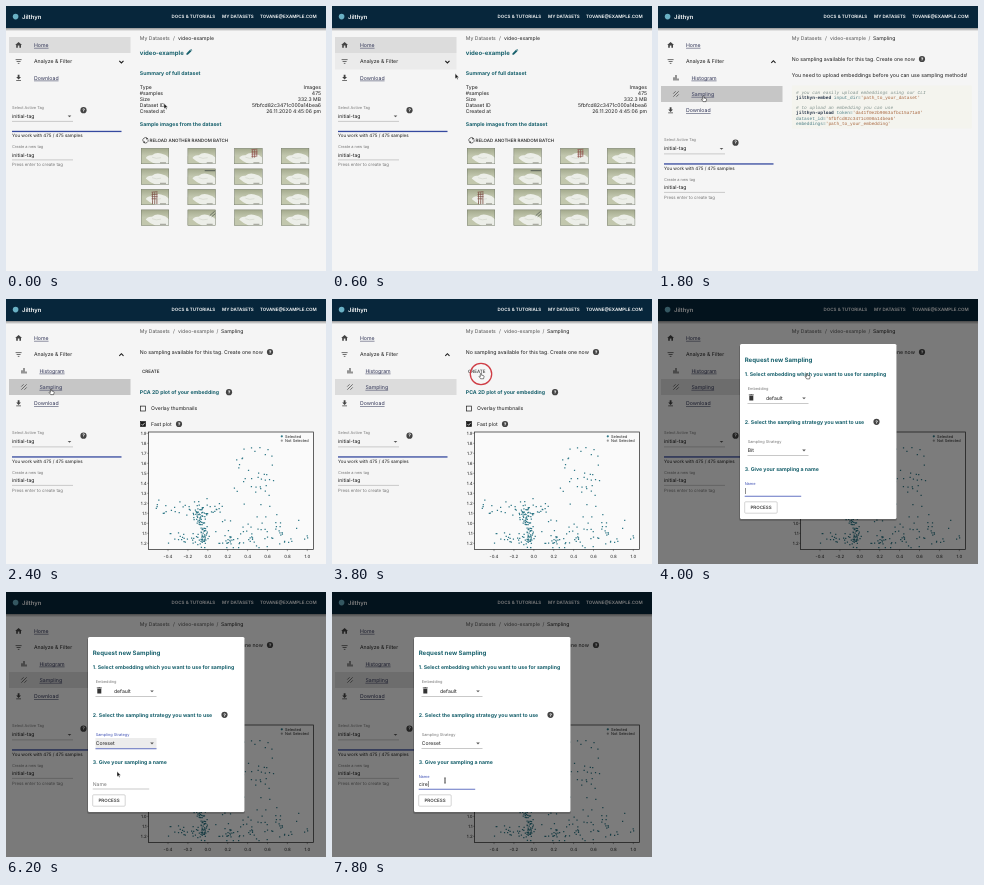
An HTML page for the animation above (8000 ms loop, 320 px wide and 265 px high).

```html
<!DOCTYPE html>
<html lang="en">
<head>
<meta charset="utf-8">
<title>Dataset sampling walkthrough</title>
<style>
  html, body { margin: 0; width: 100%; height: 100%; overflow: hidden; background: #f5f5f5; }
  svg { display: block; width: 100vw; height: 100vh; }
  text { font-family: Inter, "Open Sans", sans-serif; fill: #1c1c1c; white-space: pre; text-rendering: geometricPrecision; }
  .link { text-decoration: underline; fill: #303456; }
  .soft { fill: #777; }
  .crumb { fill: #555; }
  .head { fill: #17606c; font-weight: 700; }
  .nav { fill: #fff; font-weight: 600; }
  .mid { font-weight: 500; }
  .end { text-anchor: end; }
  .center { text-anchor: middle; }
  .code { font-family: "Liberation Mono", monospace; fill: #27343c; }
  .rem { fill: #7f918c; font-style: italic; }
  .cmd { fill: #1f2f45; font-weight: 700; }
  .str { fill: #a8673f; }
  .arg { fill: #4d7f86; }
</style>
</head>
<body>
<svg id="stage" viewBox="0 0 320 265" preserveAspectRatio="none"></svg>
<script>
const LOOP = 8000, STEP = 200, SHIFT = 32.5;
const INK = '#1c1c1c', BLUE = '#3f51b5', TEAL = '#2f7887';

// y is the middle of the capital letters
const text = (x, y, s, cls = '', size = 5.1, id = '') =>
  `<text ${id && `id="${id}"`} x="${x}" y="${(y + size * .36).toFixed(2)}" class="${cls}" font-size="${size}">${s}</text>`;
const rect = (x, y, w, h, fill, more = '') =>
  `<rect x="${x}" y="${y}" width="${w}" height="${h}" fill="${fill}" ${more}/>`;
const path = (d, more = `fill="${INK}"`) => `<path d="${d}" ${more}/>`;
const line = (d, width = .8, color = INK) =>
  path(d, `fill="none" stroke="${color}" stroke-width="${width}"`);
const at = (x, y, s) => `<g transform="translate(${x} ${y})">${s}</g>`;
const group = (id, s, more = '') => `<g id="${id}" ${more}>${s}</g>`;
const range = n => [...Array(n).keys()];

const help = (x, y) => at(x, y, `<circle r="3.1" fill="#444"/>` +
  `<text y="1.75" class="center" font-size="4.8" font-weight="700" style="fill:#fff">?</text>`);
const dropArrow = (x, y) => path(`M${x - 1.8} ${y - .8}h3.6l-1.8 1.8z`, 'fill="#555"');

const icons = {
  home: path('M0-3L3.4 0H2.4V2.8H.8V.6H-.8V2.8H-2.4V0H-3.4z', 'fill="#444"'),
  filter: line('M-3-1.9H3M-2 0H2M-.8 1.9H.8', .75, '#444'),
  bars: line('M-2 2.7V-.6M0 2.7V-2.7M2 2.7V.6', 1.1, '#444'),
  texture: line('M-2.7-.4L-.4-2.7M-2.7 2.7L2.7-2.7M.4 2.7L2.7 .4', .7, '#444'),
  download: path('M-.9-3H.9V-.7H2.4L0 1.7L-2.4-.7H-.9zM-2.4 2.3H2.4V3H-2.4z', 'fill="#444"'),
  pencil: path('M-2.6 2.6V1.2L1-2.4L2.4-1L-1.2 2.6zM1.4-2.8L2-3.3L3.3-2L2.8-1.4z', 'fill="#17606c"'),
  reload: line('M-2.6 .8A2.7 2.7 0 0 1 1.8-2M2.6-.8A2.7 2.7 0 0 1-1.8 2', .6) +
    path('M1-2.9L2.8-1.4L.8-.9zM-1 2.9L-2.8 1.4L-.8.9z'),
  trash: path('M-2-1.7H2V3H-2zM-2.5-2.9H-1L-.6-3.3H.6L1-2.9H2.5V-2.2H-2.5z', 'fill="#333"')
};

function header() {
  return rect(0, 22, 320, 3.2, 'url(#shade)') + rect(0, 0, 320, 22, '#07263b') +
    `<circle cx="9.6" cy="10.6" r="2.8" fill="#69b0c4"/>` +
    text(16, 10.6, 'Jilthyn', 'nav', 5.9) +
    text(165.6, 10.8, 'DOCS &amp; TUTORIALS', 'nav', 4.5) +
    text(216, 10.8, 'MY DATASETS', 'nav', 4.5) +
    text(254, 10.8, 'TOVANE@EXAMPLE.COM', 'nav', 4.5);
}

function sidebar() {
  const row = (icon, x, y, s, cls = 'link') =>
    at(x, y, icons[icon]) + text(x + 15.4, y, s, cls, 5.2);
  return rect(3, 31, 121.5, 16, '#dcdcdc', 'id="homeRow"') +
    rect(3, 47, 121.5, 16.5, '#ebebeb', 'id="filterRow"') +
    row('home', 12.6, 39, 'Home') +
    row('filter', 12.6, 55.5, 'Analyze &amp; Filter', '') +
    group('chevron', line('M113.3 54.8L115.4 56.9L117.5 54.8', 1.1)) +
    `<clipPath id="fold"><rect id="foldBox" y="63.5" width="125" height="0"/></clipPath>` +
    group('submenu', rect(3, 80, 121.5, 16, '#dcdcdc', 'id="samplingRow"') +
      row('bars', 18, 71.8, 'Histogram') + row('texture', 18, 88, 'Sampling'),
      'clip-path="url(#fold)"') +
    group('lower', row('download', 12.6, 71.8, 'Download') +
      text(6, 101.2, 'Select Active Tag', 'soft', 3.9) + text(6, 110, 'initial-tag') +
      dropArrow(63.5, 110.2) + help(77.5, 104.2) + line('M6 115.4H67', .35, '#777') +
      rect(6, 124.8, 109.5, 1.3, '#35499f') +
      text(6, 129.4, 'You work with 475 / 475 samples', '', 4.5) +
      text(6, 140.6, 'Create a new tag', 'soft', 3.9) + text(6, 149, 'initial-tag') +
      line('M6 153.9H67', .35, '#777') +
      text(6, 158.5, 'Press enter to create tag', 'soft', 4.4));
}

function thumb(i) {
  const tower = 'M0 0l6-.6M0 2.2h6M0 4.4h6M0 6.6h5M1 0v8M3.2 0v8M5.4 0v7';
  const extra = i === 2 ? at(17, 1.5, line(tower, .7, '#8f4f48')) :
    i === 8 ? at(10.5, 3, line(tower, .7, '#7d5046') + line('M1 8v4M3.2 8v4M5.4 7v5', .8, '#7d5046')) :
    i === 5 ? line('M17 2H27.5', .9, '#4a524b') :
    i === 13 ? line('M22 6L27 1.5M24 7L27.6 4', .7, '#4a524b') : '';
  return at(135 + i % 4 * 46.7, 142.2 + Math.floor(i / 4) * 20.5,
    rect(0, 0, 28, 15.8, 'url(#grass)') +
    path('M4 11Q6 6.5 11 7Q15 3.6 20 5.2Q25 6 28 9.5V15.8H15Q6 14 4 11z', 'fill="#eceee8"') +
    path('M0 8Q3 7 5 10Q8 13 14 15.8H0z', 'fill="#c2c7ad"') +
    line('M11 9Q15 11 20 9.5', .6, '#cfd2c8') + line('M19 14.6H25', .7, '#77786c') + extra +
    rect(.2, .2, 27.6, 15.4, 'none', 'stroke="#6d7367" stroke-width=".4"'));
}

function overviewPage() {
  const facts = [['Type', 'Images'], ['#samples', '475'], ['Size', '332.3 MB'],
    ['Dataset ID', '5fbfcd82c3471c000a14bea6'], ['Created at', '26.11.2020 4:45:06 pm']];
  return text(133.8, 47, 'video-example', 'head', 6) + at(183, 46.2, icons.pencil) +
    text(133.8, 67.2, 'Summary of full dataset', 'head', 5.2) +
    facts.map(([k, v], i) => text(133.8, 81 + i * 6, k) + text(315, 81 + i * 6, v, 'end')).join('') +
    text(133.8, 118, 'Sample images from the dataset', 'head', 5.2) +
    at(139.5, 134.3, icons.reload) +
    text(143.5, 134.4, 'RELOAD ANOTHER RANDOM BATCH', 'mid', 4.5) +
    range(16).map(thumb).join('');
}

function uploadNotice() {
  const span = (cls, s) => `<tspan class="${cls}">${s}</tspan>`;
  const code = (y, s) => text(138, y, s, 'code', 4.5);
  const pair = (k, v) => span('arg', k + '=') + span('str', `'${v}'`);
  return text(133.8, 69.3, 'You need to upload embeddings before you can use sampling methods!', '', 5.2) +
    rect(133.8, 79.5, 180, 43, '#f4f4ee') +
    code(86, span('rem', '# you can easily upload embeddings using our CLI')) +
    code(91.5, span('cmd', 'jilthyn-embed ') + pair('input_dir', 'path_to_your_dataset')) +
    code(101, span('rem', '# to upload an embedding you can use')) +
    code(106.5, span('cmd', 'jilthyn-upload ') + pair('token', 'da41f0e2b9063afbc15a71a0')) +
    code(112, pair('dataset_id', '5fbfcd82c3471c000a14bea6')) +
    code(117.5, pair('embeddings', 'path_to_your_embedding'));
}

function seeded(seed) {
  return () => {
    seed = seed + 0x6D2B79F5 | 0;
    let r = Math.imul(seed ^ seed >>> 15, 1 | seed);
    r ^= r + Math.imul(r ^ r >>> 7, 61 | r);
    return ((r ^ r >>> 14) >>> 0) / 4294967296;
  };
}

function scatter() {
  const rnd = seeded(47);
  const bell = () => rnd() + rnd() + rnd() + rnd() - 2;
  const spots = [
    [55, () => [194 + bell() * 6, 219 + bell() * 13]],
    [40, () => [197 + bell() * 4, 239 + bell() * 8]],
    [45, () => [160 + rnd() * 90, 244 - Math.abs(bell()) * 12]],
    [40, () => [149 + rnd() * 75, 210 + bell() * 7]],
    [60, () => [215 + rnd() * 88, 232 + bell() * 15]],
    [38, () => [226 + rnd() * 42, 142 + rnd() * 65]]
  ];
  const dot = ([x, y]) => `M${x.toFixed(1)} ${Math.min(y, 248).toFixed(1)}h1.25v1.25h-1.25z`;
  return path(spots.map(([n, place]) => range(n).map(() => dot(place())).join('')).join(''),
    `fill="${TEAL}"`);
}

function plotPage() {
  const yLabels = range(12).map(i => (i < 10 ? 1.9 - i * .1 : 1 + (i - 9) * .1).toFixed(1));
  const box = y => rect(134.6, y - 2.4, 4.9, 4.9, 'none', `stroke="${INK}" stroke-width=".7"`);
  return text(136, 72.7, 'CREATE', 'mid', 4.5) +
    text(133.8, 93.2, 'PCA 2D plot of your embedding', 'head', 5.2) + help(223, 93.2) +
    box(109.5) + text(145, 109.5, 'Overlay thumbnails') +
    box(125) + rect(134.6, 122.6, 4.9, 4.9, INK) + line('M135.5 125.1L136.7 126.3L138.7 123.9', .7, '#fff') +
    text(145, 125, 'Fast plot') + help(173, 125) +
    rect(142.5, 133, 165, 117.5, '#fafafa', 'stroke="#222" stroke-width=".7"') +
    yLabels.map((s, i) => text(140.6, 134.3 + i * 10, s, 'end', 4.4) + line(`M141.2 ${134.3 + i * 10}h1.3`, .4)).join('') +
    range(8).map(i => {
      const x = 162 + i * 19.9;
      return text(x, 257.3, (i * .2 - .4).toFixed(1), 'center', 4.4) + line(`M${x} 250.5v1.6`, .4);
    }).join('') +
    scatter() +
    `<circle cx="275.8" cy="137.3" r="1.1" fill="${TEAL}"/><circle cx="275.8" cy="141.7" r="1.1" fill="#999"/>` +
    text(279, 137.3, 'Selected', '', 3.9) + text(279, 141.7, 'Not Selected', '', 3.9);
}

function dialog() {
  return rect(0, 0, 320, 265, '#000', 'opacity=".5"') +
    rect(81, 46, 158, 176, '#000', 'rx="2" opacity=".18"') +
    rect(82, 45, 156.5, 175, '#fff', 'rx="1.5"') +
    text(86.7, 60.5, 'Request new Sampling', 'head', 6.1) +
    text(86.7, 74.7, '1. Select embedding which you want to use for sampling', 'head', 5.2) +
    text(89.7, 89.5, 'Embedding', 'soft', 3.9) + at(93.3, 98.5, icons.trash) +
    text(108, 99.5, 'default') + dropArrow(146, 99.3) + line('M89.5 104.5H150.5', .4, '#777') +
    text(86.7, 122.8, '2. Select the sampling strategy you want to use', 'head', 5.2) + help(218.5, 122.8) +
    rect(89.5, 146, 61, 11, '#ececec', 'id="strategyFill"') +
    text(89.7, 142.7, 'Sampling Strategy', 'soft', 3.9, 'strategyLabel') +
    text(89.7, 151.4, 'Bit', '', 5.1, 'strategy') + dropArrow(146, 151.4) +
    rect(89.5, 156.4, 61, .4, '#777', 'id="strategyLine"') +
    text(86.7, 169.8, '3. Give your sampling a name', 'head', 5.2) +
    text(86.7, 192, 'Name', 'soft', 5.1, 'nameHint') +
    text(86.7, 184.7, 'Name', '', 3.9, 'nameLabel') +
    text(86.7, 192, '', '', 5.1, 'nameValue') +
    rect(87, 189, .5, 6, INK, 'id="caret"') +
    rect(86.7, 196.8, 56.5, .4, '#777', 'id="nameLine"') +
    rect(86.7, 202.8, 32.5, 11.4, '#fff', 'rx="1" stroke="#aaa" stroke-width=".5"') +
    text(103, 208.6, 'PROCESS', 'mid center', 4.5);
}

function pointers() {
  const edge = 'fill="#fff" stroke="#111" stroke-width=".6" stroke-linejoin="round" transform="scale(.85)"';
  return group('pointer',
    group('arrow', path('M0 0V5.2L1.3 4.1L2.2 6L3 5.6L2.2 3.8H3.8z',
      'fill="#111" stroke="#fff" stroke-width=".4"')) +
    group('hand', path('M-.7.5Q0-.5.7.5V2.4L3 2.9Q3.8 3.2 3.6 4.1L3 6.6H-.4L-2.2 4Q-2.1 3.1-1.2 3.5L-.7 4z', edge)) +
    group('beam', line('M-1-2.8Q0-2.8 0-2V2Q0 2.8-1 2.8M1-2.8Q0-2.8 0-2V2Q0 2.8 1 2.8', .5)));
}

const fade = (id, ...stops) => `<linearGradient id="${id}" x2="0" y2="1">` + stops.map(([color, alpha], i) =>
  `<stop offset="${i / (stops.length - 1)}" stop-color="${color}" stop-opacity="${alpha}"/>`).join('') + '</linearGradient>';

document.getElementById('stage').innerHTML =
  `<defs>${fade('grass', ['#a3a98c', 1], ['#c3c8b0', 1], ['#b9bfa4', 1])}${fade('shade', ['#000', .4], ['#000', 0])}</defs>` +
  rect(0, 0, 320, 265, '#f5f5f5') + header() + sidebar() +
  text(133.8, 32, 'My Datasets', 'crumb', 5.1) + text(167, 32, '/', 'crumb') +
  text(172, 32, 'video-example', '', 5.1, 'datasetCrumb') +
  group('overview', overviewPage()) +
  group('sampling', text(210.5, 32, '/', 'crumb') + text(215, 32, 'Sampling') +
    text(133.8, 53, 'No sampling available for this tag. Create one now', '', 5.2) + help(264, 53)) +
  group('notice', uploadNotice()) + group('plot', plotPage()) +
  group('ring', `<circle cx="149" cy="75" r="10.7" fill="#fff" fill-opacity=".12" stroke="#cf3d45" stroke-width="1.3"/>`) +
  group('dialog', dialog()) + pointers();

const ui = {};
document.querySelectorAll('[id]').forEach(el => ui[el.id] = el);
const show = (name, on) => ui[name].style.display = on ? '' : 'none';
const set = (name, attrs) => Object.entries(attrs).forEach(([k, v]) => ui[name].setAttribute(k, v));

const route = [[0, 158, 97.5], [200, 155, 95], [800, 112, 58], [1000, 111.2, 58], [1200, 108, 62],
  [1600, 45.5, 90], [2600, 45, 90], [3400, 146, 74.5], [3600, 149, 74], [4000, 149, 74.3],
  [4800, 140, 149], [5200, 138, 150], [5600, 112, 160], [6000, 111.5, 176], [6200, 111, 179.5],
  [6800, 112, 190], [7200, 113, 188.5], [8000, 113, 188.5]];

function along(t) {
  const i = route.findIndex(([end]) => end > t), [t0, x0, y0] = route[i - 1], [t1, x1, y1] = route[i];
  const p = (t - t0) / (t1 - t0), e = p * p * (3 - 2 * p);
  return [x0 + (x1 - x0) * e, y0 + (y1 - y0) * e];
}

function draw(t) {
  const open = t < 800 ? 0 : t < 1000 ? .6 : 1;
  const inSampling = t >= 1800, plotted = t >= 2200;
  set('foldBox', { height: SHIFT * open });
  set('lower', { transform: `translate(0 ${SHIFT * open})` });
  set('chevron', { transform: open ? 'rotate(180 115.4 55.8)' : '' });
  show('homeRow', !inSampling);
  show('filterRow', t >= 600 && t < 1400);
  show('samplingRow', t >= 1600);
  set('samplingRow', { fill: t < 1800 ? '#ebebeb' : t < 2800 ? '#c6c6c6' : '#dcdcdc' });
  set('datasetCrumb', { class: inSampling ? 'crumb' : '' });
  show('overview', !inSampling);
  show('sampling', inSampling);
  show('notice', inSampling && !plotted);
  show('plot', plotted);
  show('ring', t === 3800);
  show('dialog', t >= 4000);

  const onStrategy = t >= 5200 && t < 6800, onName = t >= 4000 && !onStrategy;
  ui.strategy.textContent = t < 5600 ? 'Bit' : 'Coreset';
  ui.strategyLabel.style.fill = onStrategy ? BLUE : '';
  set('strategyLine', { fill: onStrategy ? BLUE : '#777', height: onStrategy ? .8 : .4 });
  show('strategyFill', onStrategy);
  show('nameHint', !onName);
  show('nameLabel', onName);
  ui.nameLabel.style.fill = BLUE;
  set('nameLine', { fill: onName ? BLUE : '#777', height: onName ? .8 : .4 });
  ui.nameValue.textContent = 'cire'.slice(0, Math.max(0, (t - 7000) / STEP));
  set('caret', { x: 87 + ui.nameValue.getComputedTextLength() });
  show('caret', onName && (t >= 7000 || t % 1000 < 600));

  const kind = t >= 6800 ? 'beam' : t >= 800 && t <= 4000 ? 'hand' : 'arrow';
  ['arrow', 'hand', 'beam'].forEach(name => show(name, name === kind));
  set('pointer', { transform: `translate(${along(t)})` });
}

const start = performance.now();
function tick() {
  const t = (performance.now() - start) % LOOP;
  draw(Math.floor(t / STEP) * STEP);
  requestAnimationFrame(tick);
}
tick();
</script>
</body>
</html>
```
